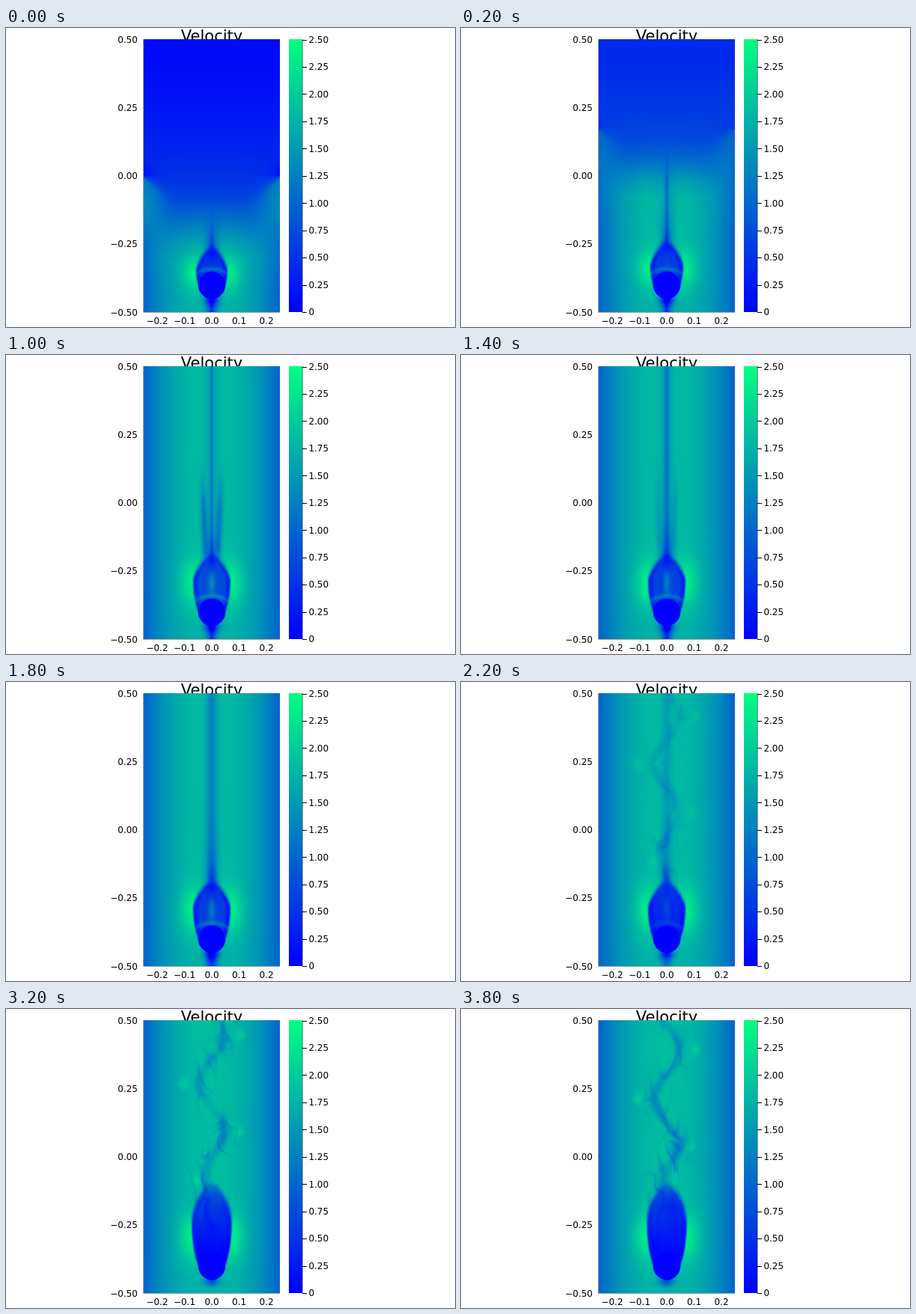
Write an HTML page with a canvas that moves like this. It is 600 px wide and 400 px high and loops after 4 s.

```html
<!DOCTYPE html>
<html lang="en">
<head>
<meta charset="utf-8">
<title>Velocity</title>
<style>
html, body { margin: 0; width: 600px; height: 400px; overflow: hidden; background: #fff; }
svg, canvas { position: absolute; display: block; }
svg { left: 0; top: 0; }
canvas { left: 184px; top: 15px; }
text { font-family: "DejaVu Sans", sans-serif; font-size: 12px; fill: #000; }
.title { font-size: 21px; }
</style>
</head>
<body>
<svg id="chart" width="600" height="400" viewBox="0 0 600 400">
  <defs>
    <linearGradient id="winter" x1="0" y1="1" x2="0" y2="0">
      <stop offset="0" stop-color="#0000ff"/>
      <stop offset="1" stop-color="#00ff80"/>
    </linearGradient>
  </defs>
  <text class="title" x="275" y="18.4" text-anchor="middle">Velocity</text>
  <rect x="378" y="15" width="18" height="365" fill="url(#winter)"/>
  <path d="M183.75 15V380.25H366M396.25 15V380.5" fill="none" stroke="#000" stroke-width=".5"/>
</svg>
<canvas id="field" width="182" height="365"></canvas>
<script>
const LEFT = 184, TOP = 15, W = 182, H = 365, MID = 275;
const FRAMES = 20, STEP = 200;
const BODY_Y = 344, BODY_R = 18.4, FLOOR = 363;
const DRIFT = 80, WAVE = 130;   // eddy travel per frame and spacing, in pixels

const clamp = (v, a = 0, b = 1) => Math.max(a, Math.min(b, v));
const mix = (a, b, k) => a + (b - a) * k;
const ease = k => k * k * (3 - 2 * k);
const smooth = (a, b, v) => ease(clamp((v - a) / (b - a)));
const bell = v => Math.exp(-v * v);

// Smooth value noise from a seeded hash.
function hash(x, y) {
  const h = Math.sin(x * 127.1 + y * 311.7 + 7) * 43758.5453;
  return h - Math.floor(h);
}
function noise(x, y) {
  const i = Math.floor(x), j = Math.floor(y), u = ease(x - i), v = ease(y - j);
  return mix(mix(hash(i, j), hash(i + 1, j), u),
    mix(hash(i, j + 1), hash(i + 1, j + 1), u), v);
}
function wisps(x, y) {
  const bend = noise(x / 25 + 9, y / 25) * 2;
  return noise(x / 11 + bend, y / 26 + bend);
}

// How far each stage of the flow has developed at a given frame.
function stageAt(frame) {
  const grow = smooth(0, 3, frame), tall = smooth(12.5, 16, frame);
  return {
    frame, grow, tall,
    turb: smooth(9, 13, frame),
    open: bell((frame - 5) / 2),
    blur: smooth(5, 9, frame),
    radius: mix(21, 25, grow) + 1.5 * tall,
    waist: mix(325, 302, grow) - 14 * tall,
    tip: mix(288, 262, grow) - 34 * tall
  };
}

// Channel flow, with the front that climbs through it at the start.
function channel(dx, y, frame) {
  const u = Math.abs(dx) / 91, wall = 91 - Math.abs(dx);
  const steady = .96 + .9 * (1 - u ** 2.2) - .1 * smooth(310, 380, y) * (1 - u);
  if (frame > 3) return steady;
  const k = frame / 3, front = 198 - 190 * k;
  const rise = clamp((y - TOP) / Math.max(1, front - TOP));
  const still = mix(.1 + .4 * rise * rise, 1, k);
  const flow = mix(still, steady, smooth(front, front + 122 - 60 * k, y));
  const edge = (1 - k) ** 2;
  if (y < front) return flow - .4 * edge * bell((front - y) / 18) * Math.exp(-wall / 12);
  const onset = smooth(0, 3 + wall * 1.3, y - front);
  return flow + .75 * edge * onset * bell((y - front - 25) / 55) * bell(wall / 28);
}

// Calm wake: a straight dark line that thickens towards the bubble.
function calmWake(v, dx, y, s) {
  const ax = Math.abs(dx), up = Math.max(0, s.tip - y);
  const reach = mix(250, -60, s.grow);
  const seen = smooth(reach - 15, reach + 60, y) * (1 - s.turb);
  const line = mix(.45, .38, s.blur) * bell(dx / mix(2.4, 6, s.blur));
  const halo = .22 * bell(dx / 11) + .65 * Math.exp(-up / 24) * bell(dx / (7 + up * .1));
  const arm = .55 * s.open * bell((ax - 9 - up * .035) / 4)
    * smooth(140, 215, y) * smooth(285, 255, y);
  v -= seen * (line + halo + arm);
  const vee = mix(25, 3, clamp((y - TOP) / 105));
  const lag = s.frame > 3 ? 0 : smooth(1, 3, s.frame) * smooth(130, 75, y);
  return mix(v, .78, lag * bell(dx / vee));
}

// Shedding wake: a meandering strand with wisps, carried upwards.
function wildWake(v, dx, y, s) {
  if (!s.turb || Math.abs(dx) > 65) return v;
  const travel = y + DRIFT * (s.frame - 16);
  const swing = Math.cos((travel - 165) / WAVE * Math.PI * 2);
  const sway = swing * (6 + 11 * smooth(270, 140, y));
  const near = smooth(90, 270, y), n = wisps(dx, travel);
  const strand = mix(.38, .7, near) * bell((dx - sway) / 7) * (.3 + .9 * n);
  const ridge = Math.max(0, 1 - Math.abs(n - .5) * 7);
  const wisp = mix(.22, .5, near) * ridge * bell((dx - sway) / 20);
  const spark = .25 * Math.abs(swing) ** 12 * bell((dx - 2.3 * sway) / 6);
  return v - s.turb * smooth(310, 275, y) * (strand + wisp - spark);
}

// Half-width of the bubble: an ellipse below its waist, a cone above it.
function halfWidth(y, s) {
  if (y > FLOOR || y < s.tip) return 0;
  if (y > s.waist) return s.radius * Math.sqrt(1 - ((y - s.waist) / (FLOOR - s.waist)) ** 2);
  return s.radius * (1 - ((s.waist - y) / (s.waist - s.tip)) ** mix(1.6, 2.2, s.tall));
}

function bubble(v, dx, y, s) {
  const half = halfWidth(y, s), ax = Math.abs(dx);
  if (!half) return v;
  const climb = clamp((s.waist - y) / (s.waist - s.tip));
  const soft = mix(2, 8, climb);
  const inside = smooth(-soft, soft, half - ax) * (1 - climb ** 4);

  const jet = .6 * s.grow * bell(dx / 4.5) * bell((y - 305) / 16);
  const arc = .45 * bell((y - 322 - ax * ax / 70) / 3);
  const rim = .35 * bell((half - ax - 3) / 3.5);
  const cap = .5 * bell(dx / 9) * bell((y - s.tip - 10) / 14);
  const calm = .6 + .15 * s.open + jet + arc - rim - cap;

  const height = clamp((334 - y) / (345 - s.tip)) ** 1.2;
  const wild = .05 + height * (.35 + .9 * wisps(dx, y + DRIFT * s.frame))
    - .2 * height * bell((half - ax - 3) / 4);
  return mix(v, Math.max(.03, mix(calm, wild, s.turb)), inside);
}

function speed(dx, y, s) {
  let v = channel(dx, y, s.frame);
  v += .52 * bell((Math.abs(dx) - s.radius - 1) / 16)
    * bell((y - mix(329, 305, s.grow)) / mix(22, 30, s.grow));
  v = calmWake(v, dx, y, s);
  v = wildWake(v, dx, y, s);
  v = bubble(v, dx, y, s);
  v -= bell(dx / 10) * bell((y - 364) / 7);
  return v * smooth(BODY_R - 1, BODY_R + .6, Math.hypot(dx, y - BODY_Y));
}

const ctx = document.getElementById("field").getContext("2d");
const cache = [];

function picture(frame) {
  if (cache[frame]) return cache[frame];
  const img = ctx.createImageData(W, H), stage = stageAt(frame);
  for (let i = 0; i < W * H; i++) {
    const dx = i % W + LEFT + .5 - MID, y = Math.floor(i / W) + TOP + .5;
    const t = clamp(speed(dx, y, stage) / 2.5);
    img.data[i * 4 + 1] = 255 * t;
    img.data[i * 4 + 2] = 255 - 127 * t;
    img.data[i * 4 + 3] = 255;
  }
  return cache[frame] = img;
}

const chart = document.getElementById("chart");
function add(tag, attrs, label) {
  const el = document.createElementNS(chart.namespaceURI, tag);
  for (const name in attrs) el.setAttribute(name, attrs[name]);
  if (label) el.textContent = label;
  chart.append(el);
}
const signed = (n, digits) => n.toFixed(digits).replace("-", "\u2212");

for (let n = -2; n <= 2; n++) {
  add("text", { x: MID + n * 36.5, y: 396, "text-anchor": "middle" }, signed(n / 10, 1));
  add("text", { x: 176, y: 202.3 - n * 91.1, "text-anchor": "end" }, signed(n / 4, 2));
}
for (let n = 0; n <= 10; n++) {
  const y = 380 - n * 36.45;
  add("path", { d: `M396 ${Math.round(y) + .5}h6`, stroke: "#000" });
  add("text", { x: 404.4, y: y + 4.3 }, n ? (n / 4).toFixed(2) : "0");
}

const begin = performance.now();
let shown = -1;
function tick() {
  const frame = Math.floor(Math.max(0, performance.now() - begin) / STEP) % FRAMES;
  if (frame !== shown) ctx.putImageData(picture(shown = frame), 0, 0);
  requestAnimationFrame(tick);
}
tick();
</script>
</body>
</html>
```
